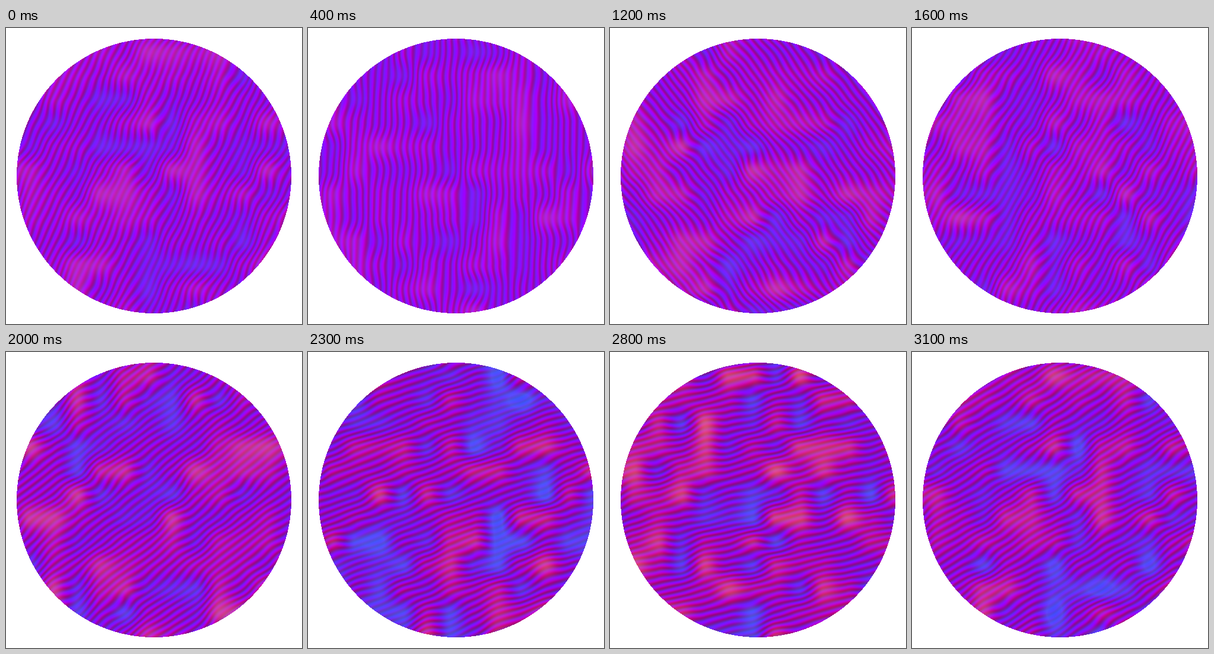
Write an HTML page with a canvas that moves like this. It is 500 by 500 pixels and loops after 3.2 s.

```html
<!DOCTYPE html>
<html lang="en">
<head>
<meta charset="utf-8">
<title>Striped disc</title>
<style>
  html, body { margin: 0; width: 100%; height: 100%; overflow: hidden; background: #fff; }
  canvas { display: block; width: 500px; height: 500px; }
</style>
</head>
<body>
<canvas id="stage" width="500" height="500"></canvas>
<script>
const SIZE = 500, CENTER = 250, RADIUS = 232;
const LOOP = 3200, STEP = 100;
const CELL = 40, GRID = 14, LAYERS = 8;
const PERIOD = 10.8, WARP = 4.5;

// The stripe normal swings back and forth: [time, degrees].
const swing = [[0, 25], [800, -21], [1200, -38], [1600, 30],
               [2000, 52], [2600, 86], [3100, 58], [LOOP, 25]];

const context = document.getElementById('stage').getContext('2d');
const image = context.createImageData(SIZE, SIZE);
const pixels = image.data;

const mix = (a, b, t) => a + (b - a) * t;
const smooth = t => t * t * (3 - 2 * t);

function hash(x, y, z) {
  const v = Math.sin(x * 127.1 + y * 311.7 + z * 74.7) * 43758.5453;
  return v - Math.floor(v);
}

function angleAt(time) {
  const next = swing.findIndex(([at]) => at > time);
  const [t0, a0] = swing[next - 1], [t1, a1] = swing[next];
  return mix(a0, a1, (time - t0) / (t1 - t0)) * Math.PI / 180;
}

// Random lattice from -1 (blue) to 1 (pink) that evolves and loops.
function latticeAt(time) {
  const z = time / LOOP * LAYERS, layer = Math.floor(z), t = smooth(z - layer);
  const scale = 1 / Math.hypot(1 - t, t);
  return Float32Array.from({ length: GRID * GRID }, (_, i) => {
    const x = i % GRID, y = Math.floor(i / GRID);
    const value = mix(hash(x, y, layer), hash(x, y, (layer + 1) % LAYERS), t);
    return (value * 2 - 1) * scale + (1 - scale) * 1;
  });
}

// Lattice cell and weight per pixel, the same on both axes.
const cellOf = [], ease = [];
for (let p = 0; p < SIZE; p++) {
  cellOf.push(Math.floor(p / CELL));
  ease.push(smooth(p % CELL / CELL));
}

function draw(time) {
  const angle = angleAt(time), lattice = latticeAt(time);
  const k = 2 * Math.PI / PERIOD;
  const kx = Math.cos(angle) * k, ky = Math.sin(angle) * k;
  const tilt = Math.sin(angle) ** 2;

  for (let y = 0; y < SIZE; y++) for (let x = 0; x < SIZE; x++) {
    const dx = x + 0.5 - CENTER, dy = y + 0.5 - CENTER;
    if (dx * dx + dy * dy > RADIUS * RADIUS) continue;

    const c = cellOf[y] * GRID + cellOf[x];
    const top = mix(lattice[c], lattice[c + 1], ease[x]);
    const bottom = mix(lattice[c + GRID], lattice[c + GRID + 1], ease[x]);
    const n = mix(top, bottom, ease[y]);

    // Stripes fade where the field is extreme, and its tint takes over.
    const extreme = Math.min(1, n * n);
    const contrast = 1 - 0.65 * extreme;
    const phase = dx * kx + dy * ky + WARP * n;
    const red = Math.cos(phase - 1.6) * contrast;
    const blue = Math.cos(phase) * contrast;

    const o = (y * SIZE + x) * 4;
    pixels[o] = 150 + (28 + 42 * tilt) * n + 24 * red;
    pixels[o + 1] = 8 + (22 + 55 * tilt) * extreme - 16 * red;
    pixels[o + 2] = 222 - 38 * tilt - (14 + 42 * tilt) * n + 60 * blue;
    pixels[o + 3] = 255;
  }
  context.putImageData(image, 0, 0);
}

let shown = -1;
function tick() {
  const time = Math.floor(performance.now() % LOOP / STEP) * STEP;
  if (time !== shown) draw(shown = time);
  requestAnimationFrame(tick);
}
tick();
</script>
</body>
</html>
```
